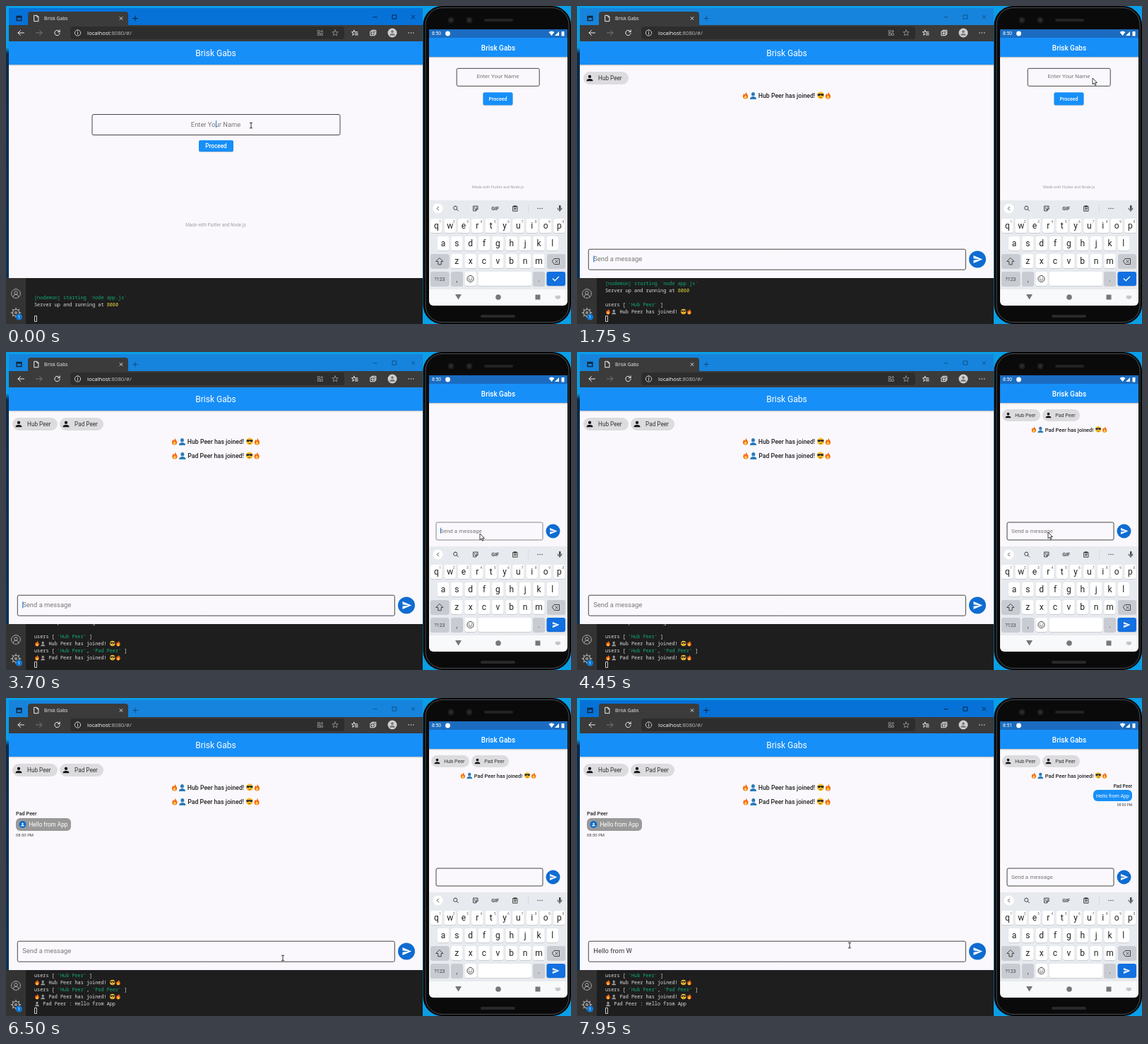
Recreate the animation shown at these times as an HTML page with a canvas. Size 800 by 450 pixels, loop 8 s.

```html
<!DOCTYPE html>
<html lang="en">
<head>
<meta charset="utf-8">
<title>Chat demo</title>
<style>
html, body { margin: 0; height: 100%; overflow: hidden; background: #1e1e1e; }
canvas { display: block; width: 100vw; height: 100vh; }
</style>
</head>
<body>
<canvas id="stage" width="800" height="450"></canvas>
<script>
const c = document.getElementById('stage').getContext('2d');
const LOOP = 8000;
const TITLE = 'Brisk Gabs', WEB = 'Hub Peer', APP = 'Pad Peer';
const APP_MSG = 'Hello from App', WEB_MSG = 'Hello from Web';
const BLUE = '#178ff8', DEEP = '#0f6cd0', PAGE = '#faf8fc', SKY = '#0a9ee6';
const SANS = 'Roboto, sans-serif', UI = '"Open Sans", sans-serif', MONO = '"Noto Sans Mono", monospace';

const AT = {
  webJoin: 1250, webPage: 1170, webChips: 1500, phoneFocus: 1600, appJoin: 3150,
  phonePage: 3300, phoneChips: 3800, appSend: 6150, webReceive: 6300,
  phoneEcho: 6650, webFocus: 6700, minute: 7200
};

const PATHS = {
  person: 'M12 12a4 4 0 1 0 0-8 4 4 0 0 0 0 8zm0 2c-2.7 0-8 1.3-8 4v2h16v-2c0-2.7-5.3-4-8-4z',
  bust: 'M12 14c3 0 5.500-3 5.500-7S15 1 12 1 6.500 3 6.500 7 9 14 12 14zM9 12h6v3c4 1 7 2 7 8H2c0-6 3-7 7-8z',
  send: 'M2 21l21-9L2 3v7l15 2-15 2z',
  flame: 'M13 1c1 5 7 8 7 14a8 8 0 0 1-16 0c0-4 2-5 3-9 2 1 2 3 2 4 3-2 4-5 4-9z',
  core: 'M12 11c1 3 4 4 4 7a4 4 0 0 1-8 0c0-3 3-4 4-7z',
  shades: 'M2 8h20v3a4.5 3.5 0 0 1-9 1h-2a4.5 3.5 0 0 1-9-1z',
  arrow: 'M0 0v10.5l2.5-2.2 1.7 3.8 1.7-.8-1.7-3.6h3.4z'
};
const STROKES = {
  left: 'M21 12H4m7-7-7 7 7 7', right: 'M3 12h17m-7-7 7 7-7 7',
  reload: 'M19 8a8 8 0 1 0 1 5M20 3v6h-6', cross: 'M5 5l14 14M19 5L5 19', plus: 'M12 3v18M3 12h18',
  minus: 'M4 13h16', box: 'M4 4h16v16H4z', doc: 'M5 2h9l5 5v15H5zM14 2v5h5',
  tabs: 'M3 4h18v16H3zM3 8h18', info: 'M12 2a10 10 0 1 0 0 20 10 10 0 0 0 0-20M12 11v6M12 7v1',
  account: 'M12 1a11 11 0 1 0 0 22 11 11 0 0 0 0-22M12 6a4 4 0 1 0 0 8 4 4 0 0 0 0-8M5 20q1-6 7-6t7 6',
  apps: 'M3 3h7v7H3zM3 14h7v7H3zM14 14h7v7h-7zM14 6h8M18 2v8',
  star: 'M12 2l3 7h7l-5.500 5 2 7-6.500-4-6.500 4 2-7L2 9h7z',
  favs: 'M9 3l2 6h10M9 3L7 9H1l5 4-2 7 6-4M13 14h9M13 19h9',
  copy: 'M7 7V3h14v14h-4M3 7h14v14H3zM10 10v8M6 14h8',
  search: 'M10 3a7 7 0 1 0 0 14 7 7 0 0 0 0-14M15 15l6 6',
  sticker: 'M4 3h16v11l-7 7H4zM20 14h-7v7M8 8v2M15 8v2M8 14q3 2 5 0',
  clip: 'M4 4h16v18H4zM8 2h8v5H8zM8 12h8M8 16h6',
  mic: 'M12 3v9M5 11q0 7 7 7t7-7M12 18v4', shift: 'M12 3l9 9h-5v8H8v-8H3z',
  erase: 'M8 4h14v16H8l-6-8zM11 9l6 6M17 9l-6 6', check: 'M3 12l6 6L21 6',
  more: 'M4 12h.1M12 12h.1M20 12h.1', prev: 'M15 5l-7 7 7 7', next: 'M9 5l7 7-7 7',
  smile: 'M12 2a10 10 0 1 0 0 20 10 10 0 0 0 0-20M8 9v1M16 9v1M7 14q5 6 10 0',
  keys: 'M2 6h20v11H2zM5 9h14M5 12h14M8 15h8M10 20h4', ibeam: 'M8 3h3q1 0 1 2v14q0 2-1 2H8M16 3h-3q-1 0-1 2M16 21h-3q-1 0-1-2',
  gear: 'M12 2v3M12 19v3M2 12h3M19 12h3M5 5l2 2M17 17l2 2M19 5l-2 2M7 17l-2 2M12 5a7 7 0 1 0 0 14 7 7 0 0 0 0-14M12 10a2 2 0 1 0 0 4 2 2 0 0 0 0-4'
};

let t = 0;
const clamp = x => Math.max(0, Math.min(1, x));
const typed = (s, start, step) => s.slice(0, Math.max(0, Math.floor((t - start) / step)));
const blink = odd => Math.floor(t / 500) % 2 === odd;

function box(x, y, w, h, fill, r = 0, line) {
  c.beginPath();
  c.roundRect(x, y, w, h, r);
  if (fill) { c.fillStyle = fill; c.fill(); }
  if (line) { c.strokeStyle = line; c.lineWidth = 1; c.stroke(); }
}
function disc(x, y, r, fill) {
  c.beginPath();
  c.arc(x, y, r, 0, 7);
  c.fillStyle = fill;
  c.fill();
}
// y is the middle of the capitals; returns the advance width
function text(s, x, y, size, color, { align = 'left', weight = 400, font = SANS } = {}) {
  c.font = `${weight} ${size}px ${font}`;
  c.textAlign = align;
  c.fillStyle = color;
  c.fillText(s, x, y + size * 0.36);
  return c.measureText(s).width;
}
function glyph(name, x, y, size, color, weight = 1) {
  const k = size / 24;
  c.save();
  c.translate(x - size / 2, y - size / 2);
  c.scale(k, k);
  c.lineCap = 'round';
  if (PATHS[name]) {
    c.fillStyle = color;
    c.fill(new Path2D(PATHS[name]));
  } else {
    c.strokeStyle = color;
    c.lineWidth = weight / k;
    c.stroke(new Path2D(STROKES[name]));
  }
  c.restore();
}
function clipped(x, y, w, h, draw) {
  c.save();
  c.beginPath();
  c.rect(x, y, w, h);
  c.clip();
  draw();
  c.restore();
}
function fire(x, y, s) {
  glyph('flame', x, y, s, '#f46a18');
  glyph('core', x, y, s, '#ffd04a');
}
function cool(x, y, s) {
  disc(x, y, s * 0.46, '#fbc02d');
  glyph('shades', x, y - s * 0.05, s * 0.95, '#2b2b2b');
  box(x - s * 0.15, y + s * 0.22, s * 0.3, s * 0.08, '#7a4a10');
}

function joined(name, x, y, size) {
  const s = name + ' has joined!', e = size * 1.25;
  const half = text(s, x, y, size, '#222', { align: 'center', weight: 500 }) / 2;
  fire(x - half - size * 2.1, y - 0.5, e);
  glyph('bust', x - half - size * 0.85, y, e, '#2b7bb9');
  cool(x + half + size * 0.9, y - 0.5, e);
  fire(x + half + size * 2.1, y - 0.5, e);
}
function chip(name, x, y, w, h, size) {
  box(x, y - h / 2, w, h, '#dcdbde', h / 2);
  glyph('person', x + h / 2, y, size * 1.6, '#111');
  text(name, x + size * 2.57, y, size, '#333');
}
function page(x, y, w, h, bar, titleSize, weight) {
  box(x, y + bar, w, h - bar, PAGE);
  box(x, y + bar, w, 1, '#00000030');
  box(x, y + bar + 1, w, 1, '#00000012');
  box(x, y, w, bar, BLUE);
  text(TITLE, x + w / 2, y + bar / 2 + 0.5, titleSize, '#fff', { align: 'center', weight });
}
const webPage = () => page(4, 50, 586, 335, 33, 12, 400);
const phonePage = () => page(599, 45, 196, 230, 27, 10, 500);

function proceed(x, y, w, h, size) {
  box(x, y + 1, w, h, '#00000030', 2);
  box(x, y, w, h, BLUE, 2);
  text('Proceed', x + w / 2, y + h / 2 + 0.3, size, '#fff', { align: 'center', weight: 500 });
}
function messageField(x, y, w, h, size, value, caret, hint, line) {
  box(x, y, w, h, null, 2, line);
  const tx = x + 7 * size / 9.4, ty = y + h * 0.46 + 0.3;
  if (!value && hint) text('Send a message', tx, ty, size, '#777');
  const tw = text(value, tx, ty, size, '#333');
  if (caret) box(tx + tw, ty - size / 2, 1, size, '#1a78d8');
}
// Incoming page slides up and fades over the previous one.
function slideIn(start, height, draw) {
  const p = clamp((t - start) / 300);
  if (!p) return;
  c.save();
  c.globalAlpha = Math.pow(p, 1.2);
  c.translate(0, height / 4 * Math.pow(1 - p, 2.2));
  draw();
  c.restore();
}

function desktop() {
  const g = c.createLinearGradient(0, 0, 0, 450);
  g.addColorStop(0, SKY);
  g.addColorStop(0.13, SKY);
  g.addColorStop(0.15, '#0b2a48');
  g.addColorStop(1, '#0c3458');
  box(0, 0, 590, 450, g);
  box(0, 0, 800, 3, SKY);
  box(590, 0, 210, 450, SKY);
}

function terminal() {
  box(0, 385, 590, 65, '#1e1e1e');
  box(0, 385, 28, 65, '#333');
  glyph('account', 14, 407, 14, '#aaa');
  glyph('gear', 14, 434, 16, '#aaa', 1.3);
  disc(18.5, 440, 4.5, '#0e78d4');
  text('1', 18.5, 440, 6, '#fff', { align: 'center' });

  const W = '#dedede', G = '#12a877';
  const quote = n => [`'${n}'`, G];
  const lines = [
    [['[nodemon] starting `node app.js`', G]],
    [['Server up and running at ', W], ['8080', '#e8d840']],
    []
  ];
  const join = (n, list) => {
    lines.push([['users [ ', W], ...list, [' ]', W]]);
    lines.push([['fire'], ['bust'], [` ${n} has joined! `, W], ['cool'], ['fire']]);
  };
  if (t >= AT.webJoin) join(WEB, [quote(WEB)]);
  if (t >= AT.appJoin) join(APP, [quote(WEB), [', ', W], quote(APP)]);
  if (t >= AT.webReceive) lines.push([['bust'], [` ${APP} : ${APP_MSG}`, W]]);

  clipped(28, 385, 562, 65, () => lines.forEach((line, i) => {
    const y = 433 - 10 * (lines.length - 1 - i);
    let x = 40;
    for (const [s, color] of line) {
      if (color) { x += text(s, x, y, 6.85, color, { font: MONO, weight: 500 }); continue; }
      if (s === 'fire') fire(x + 4, y - 0.5, 8.5);
      if (s === 'cool') cool(x + 4, y - 0.5, 8);
      if (s === 'bust') glyph('bust', x + 4, y, 7, '#999');
      x += 8.2;
    }
  }));
  box(40.5, 438.5, 3, 8, null, 0, '#ccc');
}

function browserFrame() {
  const active = t < AT.phoneFocus || t >= AT.webFocus;
  box(4, 3, 586, 25, active ? '#0672d8' : '#1684dc');
  box(31, 8, 142, 22, '#3b3b3b', [4, 4, 0, 0]);
  box(4, 27, 586, 23, '#3b3b3b');
  glyph('tabs', 18.5, 17.5, 9, '#10273f', 1.5);
  glyph('doc', 43, 17.5, 10, '#eee');
  text(TITLE, 54, 17.5, 6.8, '#eee', { font: UI });
  glyph('cross', 163, 17.5, 6.5, '#ddd');
  c.globalAlpha = active ? 1 : 0.5;
  glyph('plus', 183, 17.5, 9, '#06233f');
  glyph('minus', 522.5, 15.5, 8, '#06233f');
  glyph('box', 550, 15.5, 8, '#06233f');
  glyph('cross', 576.5, 15.5, 8, '#06233f');
  c.globalAlpha = 1;

  glyph('left', 21, 38, 12, '#eee');
  glyph('right', 47, 38, 12, '#777');
  glyph('reload', 72.5, 38, 11, '#eee');
  box(91, 29, 388, 18, '#2d2d2d', 4);
  glyph('info', 101.5, 38, 10, '#ccc');
  const host = text('localhost', 115, 38, 7.75, '#fff', { font: UI });
  text(':8080/#/', 115 + host, 38, 7.75, '#bbb', { font: UI });
  glyph('apps', 445, 38, 9, '#888');
  glyph('star', 466, 38, 10, '#888');
  glyph('favs', 494, 38, 10, '#eee');
  glyph('copy', 520, 38, 10, '#eee');
  disc(547, 38, 6.5, '#d0d0d0');
  glyph('person', 547, 38, 11, '#777');
  glyph('more', 573.5, 38, 10, '#eee', 1.4);
}

function webLogin() {
  webPage();
  box(122, 153.5, 351, 29, null, 2, '#444');
  const name = typed(WEB, 250, 95);
  text(name || 'Enter Your Name', 297, 167.5, 9.4, name ? '#222' : '#777', { align: 'center' });
  if (!name && blink(0)) box(297, 162, 1, 10, '#1a78d8');
  proceed(273, 190, 49, 16, 8.2);
  text('Made with Flutter and Node.js', 297, 310, 6.45, '#a0a0a5', { align: 'center' });
}

function webChat() {
  webPage();
  if (t >= AT.webChips) {
    chip(WEB, 9, 102, 64, 18, 8.2);
    joined(WEB, 297, 127, 8.7);
  }
  if (t >= AT.appJoin) {
    chip(APP, 76, 102, 62, 18, 8.2);
    joined(APP, 297, 147, 8.7);
  }
  if (t >= AT.webReceive) {
    text(APP, 14, 163, 7.3, '#222', { weight: 500 });
    box(14, 170, 78, 18, '#999', 6);
    disc(23.5, 179, 5, DEEP);
    glyph('person', 23.5, 179, 7, '#fff');
    text(APP_MSG, 32.5, 179.3, 8.2, '#fff');
    text('08:50 PM', 14, 194, 5.9, '#444');
  }
  messageField(16.3, 344.2, 534, 29, 9.4, typed(WEB_MSG, 6850, 90), t > AT.webChips && t < 4300 && blink(1), true, '#444');
  disc(567, 358.5, 12, DEEP);
  glyph('send', 567.5, 358.5, 14.5, '#fff');
}

function phoneLogin() {
  phonePage();
  box(638.2, 88.3, 117, 25, null, 2, '#444');
  const name = typed(APP, 1720, 95);
  const w = text(name || 'Enter Your Name', 696.5, 99.5, 8, name ? '#333' : '#777', { align: 'center' });
  if (name) {
    const end = 696.5 + w / 2, word = c.measureText(name.split(' ').pop()).width;
    box(end - word, 104, word, 0.8, '#444');
    box(end, 95, 1, 9, '#1a78d8');
  }
  proceed(675.5, 122.3, 42, 18, 7);
  text('Made with Flutter and Node.js', 696.5, 256.5, 5.5, '#a0a0a5', { align: 'center' });
}

function phoneChat() {
  phonePage();
  const ready = t >= AT.phoneChips;
  if (ready) {
    chip(WEB, 602, 89.5, 54, 17, 7.1);
    chip(APP, 659, 89.5, 53, 17, 7.1);
    joined(APP, 697, 110, 7.5);
  }
  if (t >= AT.phoneEcho) {
    text(APP, 786, 124.5, 6.5, '#222', { align: 'right', weight: 500 });
    box(731, 130, 55, 16, BLUE, 6);
    text(APP_MSG, 758.5, 138, 7, '#fff', { align: 'center' });
    text('08:50 PM', 786, 151, 5, '#444', { align: 'right' });
  }
  const sent = t >= AT.appSend;
  const value = sent ? '' : typed(APP_MSG, 4540, 100);
  messageField(609, 241, 151, 25, 8, value, !sent && (value || blink(1)), !sent || t >= AT.phoneEcho, ready ? '#444' : '#888');
  disc(774.5, 253.5, 10, DEEP);
  glyph('send', 775, 253.5, 12, '#fff');
}

function keyboard() {
  const INK = '#444', GREY = '#c8ccd2';
  box(599, 275, 196, 126, '#e7eaee');
  const suggesting = t >= 1815 && t < AT.phonePage;
  disc(611.5, 286.5, 7, '#fff');
  glyph(suggesting ? 'next' : 'prev', 611.5, 286.5, 8, INK);
  if (suggesting) {
    ['Us', 'Is', 'US'].forEach((s, i) => text(s, 642.5 + i * 53.5, 287, 8.5, INK, { align: 'center' }));
    [669, 723].forEach(x => box(x, 280, 1, 13, '#d0d3d8'));
  } else {
    glyph('search', 637, 286.5, 9, INK);
    glyph('sticker', 665, 286.5, 9, INK);
    text('GIF', 692.5, 286.5, 7, INK, { align: 'center', weight: 700 });
    glyph('clip', 721, 286.5, 9, INK);
    box(739, 280, 1, 13, '#d8dbe0');
    glyph('more', 756, 286.5, 9, INK, 1.5);
  }
  glyph('mic', 784, 286.5, 10, INK);
  box(783, 282, 2.5, 6, INK, 1);

  const key = (x, y, w, fill = '#fff') => {
    box(x, y + 1, w, 20, '#00000020', 3);
    box(x, y, w, 20, fill, 3);
  };
  [['qwertyuiop', 609.3, 301], ['asdfghjkl', 619, 326], ['zxcvbnm', 638.3, 351]].forEach(([row, x0, y]) => {
    [...row].forEach((ch, i) => {
      const x = x0 + i * 19.35;
      key(x - 8.2, y, 16.4);
      text(ch, x, y + 9.5, 12, '#222', { align: 'center' });
      if (y === 301) text((i + 1) % 10, x + 5.5, y + 4, 4.5, '#555', { align: 'center' });
    });
  });
  key(601, 351, 26.5, GREY);
  glyph('shift', 614, 361.5, 13, INK);
  key(766, 351, 26, GREY);
  glyph('erase', 778.5, 361.5, 12, INK);
  key(601, 376, 26.5, GREY);
  text('?123', 614, 386.5, 7, INK, { align: 'center' });
  key(630, 376, 17, GREY);
  text(',', 638.5, 386.5, 10, INK, { align: 'center' });
  key(649.5, 376, 16.5);
  glyph('smile', 657.5, 386, 11, INK);
  key(668.5, 376, 75.5);
  key(746, 376, 17, GREY);
  text('.', 754.5, 386.5, 10, INK, { align: 'center' });
  key(765.5, 376, 26.5, '#1270e0');
  glyph(t < AT.phonePage ? 'check' : 'send', 778.5, 386, 11, '#fff', 1.3);

  box(599, 401, 196, 23, '#f8f9fb', [0, 0, 6, 6]);
  c.fillStyle = '#777';
  c.fill(new Path2D('M636 408h9l-4.500 7.500z'));
  disc(697, 412, 3.8, '#777');
  box(749.5, 408.5, 7, 7, '#777');
  glyph('keys', 781.5, 412, 7, '#aaa', 0.7);
}

function phone() {
  box(590.5, 0, 209.5, 450, '#070707', 27);
  box(594, 2.5, 203, 445, '#0a0a0b', 24, '#4a4c50');
  [630, 656].forEach(x => {
    disc(x, 20, 4.5, '#1d1d20');
    disc(x, 20, 2, '#303035');
  });
  box(677, 18, 41, 4, '#232325', 2);
  box(672, 437, 49, 4, '#29292b', 2);

  box(599, 33, 196, 12, '#1b6cc0');
  text(t < AT.minute ? '8:50' : '8:51', 603, 39, 6.8, '#fff');
  disc(625.5, 39, 3.4, '#fff');
  c.fillStyle = '#fff';
  c.fill(new Path2D('M768.500 37q4-3 8 0l-4 5zM783 36v6h-6z'));
  box(786.5, 36, 4, 6.5, '#fff', 0.5);

  clipped(599, 45, 196, 230, () => {
    if (t < AT.phonePage + 300) phoneLogin();
    slideIn(AT.phonePage, 230, phoneChat);
  });
  keyboard();
}

const pointer = [
  [0, 347, 169], [1000, 347, 169], [1300, 631, 124], [1600, 735, 103], [1750, 730, 102],
  [2600, 730, 102], [2850, 697, 130], [3000, 697, 130], [3500, 671, 257], [4000, 671, 257],
  [4300, 667, 255], [6150, 667, 255], [6500, 392, 368], [6700, 386, 350], [LOOP, 386, 350]
];
function mouse() {
  const i = pointer.findIndex(p => p[0] > t);
  const [t0, x0, y0] = pointer[i - 1], [t1, x1, y1] = pointer[i];
  const p = (t - t0) / (t1 - t0), k = p * p * (3 - 2 * p);
  const x = x0 + (x1 - x0) * k, y = y0 + (y1 - y0) * k;
  if (x < 590) return glyph('ibeam', x, y, 10, '#222', 0.9);
  c.save();
  c.translate(x, y);
  c.scale(0.85, 0.85);
  const arrow = new Path2D(PATHS.arrow);
  c.fillStyle = '#fff';
  c.strokeStyle = '#222';
  c.lineWidth = 1;
  c.fill(arrow);
  c.stroke(arrow);
  c.restore();
}

function frame(now) {
  t = now % LOOP;
  desktop();
  terminal();
  browserFrame();
  clipped(4, 50, 586, 335, () => {
    if (t < AT.webPage + 300) webLogin();
    slideIn(AT.webPage, 335, webChat);
  });
  phone();
  mouse();
  requestAnimationFrame(frame);
}
requestAnimationFrame(frame);
</script>
</body>
</html>
```
